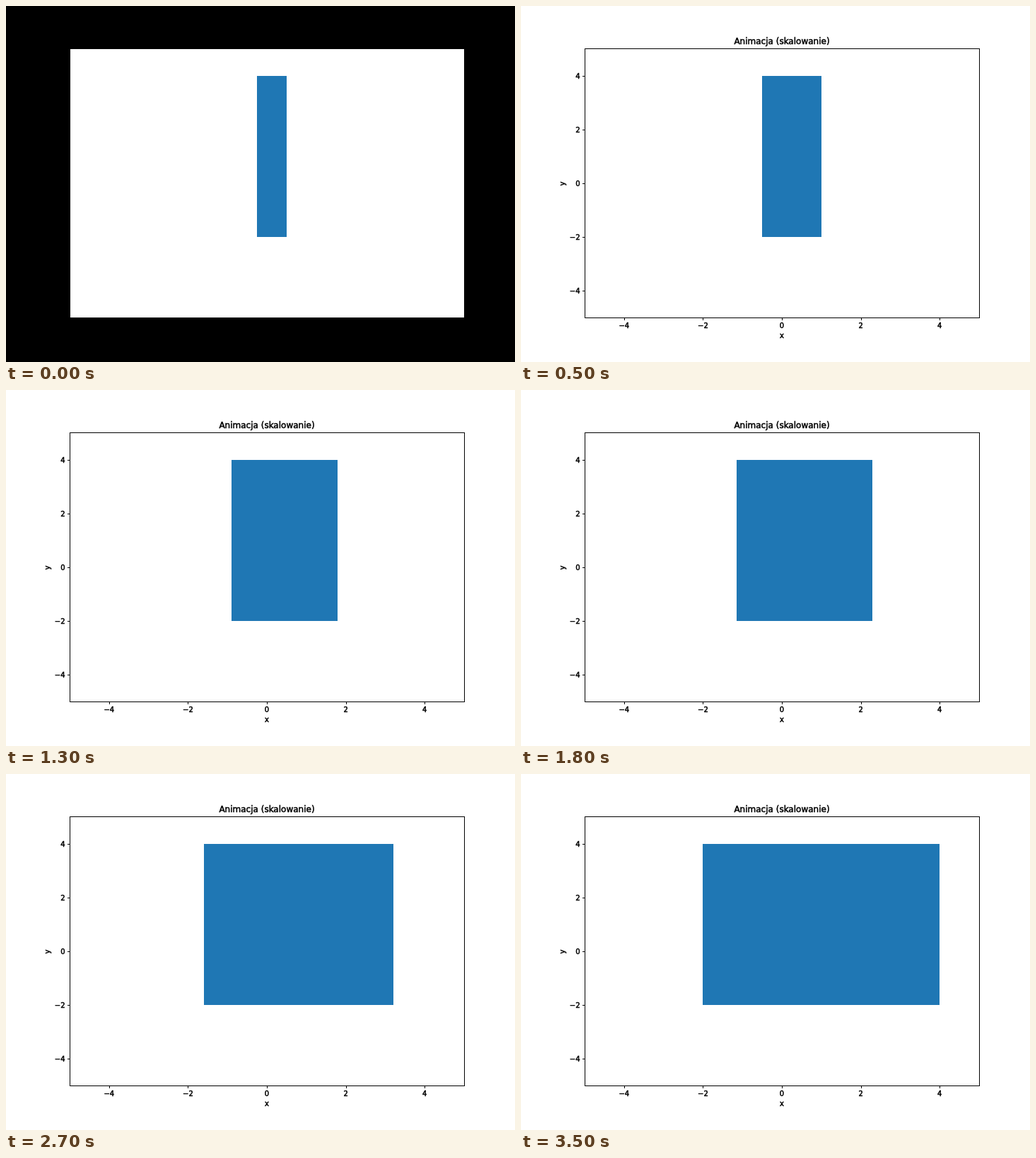
Animation, 720 px wide and 504 px high, one loop 3600 ms. Source, as an HTML page:

```html
<!DOCTYPE html>
<html lang="pl">
<head>
<meta charset="utf-8">
<title>Animacja (skalowanie)</title>
<style>
html, body { margin: 0; width: 100%; height: 100%; overflow: hidden; background: #fff; }
svg { display: block; }
text { font: 10px "DejaVu Sans", sans-serif; text-anchor: middle; stroke: #000; stroke-width: .5px; }
.title { font-size: 12px; }
.tick { text-anchor: end; }
path { stroke: #000; fill: none; shape-rendering: crispEdges; }
</style>
</head>
<body>
<svg width="720" height="504" viewBox="0 0 720 504">
  <rect id="page" width="720" height="504"/>
  <rect x="90" y="60" width="558" height="381" fill="#fff"/>
  <rect id="bar" fill="#1f77b4"/>
  <path d="M90.5 60.5H648.5V441.5H90.5Z"/>
  <g id="ticks"></g>
  <text class="title" x="369" y="54">Animacja (skalowanie)</text>
  <text x="369" y="470">x</text>
  <text transform="translate(62 251.5) rotate(-90)">y</text>
</svg>
<script>
const LOOP = 3600, STEP = 100;
const px = x => 369 + x * 55.8;
const py = y => 250.74 - y * 38.052;
const byId = id => document.getElementById(id);
const page = byId('page'), bar = byId('bar');

function add(tag, attrs, text = '') {
  const el = document.createElementNS('http://www.w3.org/2000/svg', tag);
  for (const key in attrs) el.setAttribute(key, attrs[key]);
  el.textContent = text;
  byId('ticks').append(el);
}

for (let v = -4; v <= 4; v += 2) {
  const label = String(v).replace('-', '\u2212');
  const x = Math.round(px(v)) + 0.5, y = Math.round(py(v)) + 0.5;
  add('path', { d: `M${x} 441V445M87 ${y}H91` });
  add('text', { x: px(v), y: 456 }, label);
  add('text', { x: 83.5, y: Math.round(py(v)) + 4, class: 'tick' }, label);
}

const top4 = Math.round(py(4));
bar.setAttribute('y', top4);
bar.setAttribute('height', Math.round(py(-2)) - top4);

function draw(time) {
  const step = Math.floor((time % LOOP) / STEP);
  const scale = 0.125 + 0.025 * step;
  const left = Math.round(px(-2 * scale)), right = Math.round(px(4 * scale));
  bar.setAttribute('x', left);
  bar.setAttribute('width', right - left);
  page.setAttribute('fill', step === 0 ? '#000' : '#fff');
}

const start = performance.now();
function tick() {
  draw(performance.now() - start);
  requestAnimationFrame(tick);
}
tick();
</script>
</body>
</html>
```
